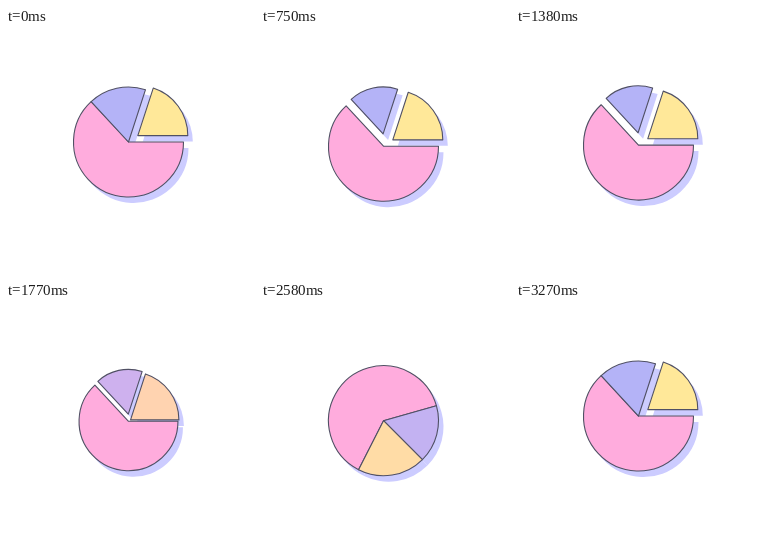
These frames come from a looping animation (249 px wide and 246 px high, 3300 ms). An HTML page with a canvas:

```html
<!DOCTYPE html>
<html lang="en">
<head>
<meta charset="utf-8">
<title>Pie chart loop</title>
<style>
  html, body { margin: 0; width: 100%; height: 100%; overflow: hidden; background: #fff; }
  canvas { display: block; }
</style>
</head>
<body>
<canvas id="stage" width="249" height="246"></canvas>
<script>
const ctx = document.getElementById('stage').getContext('2d');
const LOOP = 3300, STEP = 30, TAU = Math.PI * 2;
const CX = 122.5, RADIUS = 55;
const PINK = [255, 172, 221], SHADOW = '#ccccff', LINE = '#505064';

// Angles run counter-clockwise from three o'clock, in degrees.
const slices = [
  { from: 132.8, to: 360, color: PINK, dx: 0, dy: 0, shrink: 0, out: () => 0 },
  { from: 72, to: 132.8, color: [180, 179, 247], dx: -0.4, dy: -12.3, shrink: 8,
    out: t => ramp(t, 200, 480) - ramp(t, 1670, 1920) },
  { from: 0, to: 72, color: [255, 232, 153], dx: 9.3, dy: -6.4, shrink: 5,
    out: t => 1 - ramp(t, 1602, 1850) + ramp(t, 2990, 3240) }
];

function ramp(t, a, b) {
  const u = Math.min(1, Math.max(0, (t - a) / (b - a)));
  return u * u * (3 - 2 * u);
}

function easeInOut(u) {
  return u < 0.5 ? 4 * u ** 3 : 1 - 4 * (1 - u) ** 3;
}

function mix(a, b, k) {
  return `rgb(${a.map((v, i) => Math.round(v + (b[i] - v) * k)).join()})`;
}

function pieScale(t) {
  return 1 - 0.132 * ramp(t, 1640, 1830) + 0.332 * ramp(t, 1830, 2000) - 0.2 * ramp(t, 2000, 2280);
}

function spin(t) {
  return 360 * easeInOut(Math.min(1, Math.max(0, (t - 2250) / 762)));
}

function wedge(x, y, r, from, to) {
  ctx.beginPath();
  ctx.moveTo(x, y);
  ctx.arc(x, y, r, -from * TAU / 360, -to * TAU / 360, true);
  ctx.closePath();
}

function drawRing(t) {
  const u = (t - 1830) / 330;
  if (u <= 0 || u >= 1) return;
  ctx.beginPath();
  ctx.arc(CX, 119, 50 + 66 * (1 - (1 - u) ** 2), 0, TAU);
  ctx.lineWidth = 4 * (1 - u);
  ctx.strokeStyle = SHADOW;
  ctx.stroke();
}

function draw(t) {
  const cy = 117 - 3 * Math.cos(TAU * t / 1100);
  const scale = pieScale(t), turn = spin(t);
  const blush = ramp(t, 1640, 1970) - ramp(t, 2280, 2700);

  ctx.fillStyle = '#fff';
  ctx.fillRect(0, 0, 249, 246);
  drawRing(t);

  const parts = slices.map(s => {
    const out = s.out(t);
    return {
      x: CX + s.dx * out * scale,
      y: cy + s.dy * out * scale,
      r: (RADIUS - s.shrink * out) * scale,
      from: s.from - turn,
      to: s.to - turn,
      fill: mix(s.color, PINK, blush)
    };
  });

  ctx.fillStyle = SHADOW;
  for (const p of parts) {
    wedge(p.x + 5, p.y + 6, p.r, p.from, p.to);
    ctx.fill();
  }
  ctx.lineWidth = 1.1;
  ctx.lineJoin = 'round';
  ctx.strokeStyle = LINE;
  for (const p of parts) {
    wedge(p.x, p.y, p.r, p.from, p.to);
    ctx.fillStyle = p.fill;
    ctx.fill();
    ctx.stroke();
  }
}

const start = performance.now();
function tick() {
  const t = (performance.now() - start) % LOOP;
  draw(Math.floor(t / STEP) * STEP);
  requestAnimationFrame(tick);
}
tick();
</script>
</body>
</html>
```
